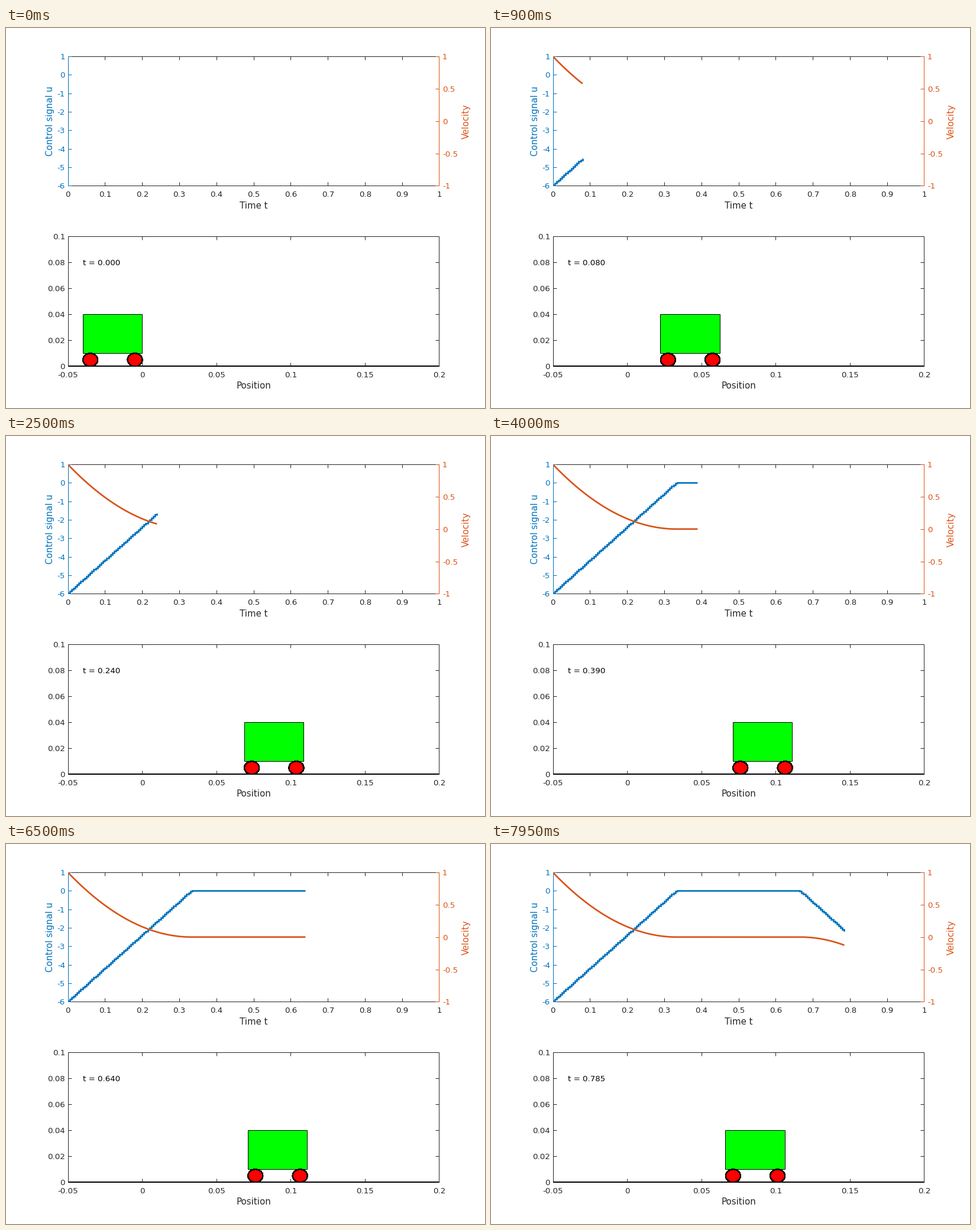
Animation of 810x644 px, one loop 8 s. Source, as a matplotlib script:

```python
import numpy as np
import matplotlib.pyplot as plt
from matplotlib.animation import FuncAnimation
from matplotlib.patches import Ellipse, Rectangle

W, H, DPI = 810, 644, 64
PT = 72 / DPI  # points per pixel
FRAMES, INTERVAL = 160, 50
DT = 0.005

DARK = (0.15, 0.15, 0.15)
BLUE = (0, 0.447, 0.741)
ORANGE = (0.85, 0.325, 0.098)
LEFT, RIGHT = 104.52, 732.49
TICK = 6

plt.rcParams["font.family"] = "DejaVu Sans"
fig = plt.figure(figsize=(W / DPI, H / DPI), dpi=DPI, facecolor="white")
ax = fig.add_axes([0, 0, 1, 1])
ax.set_xlim(0, W)
ax.set_ylim(H, 0)
ax.axis("off")


class Panel:
    """Maps data ranges onto a pixel box and draws its frame."""

    def __init__(self, top, bottom, xlim):
        self.top, self.bottom, self.xlim = top, bottom, xlim

    def x(self, v):
        lo, hi = self.xlim
        return LEFT + (RIGHT - LEFT) * (v - lo) / (hi - lo)

    def y(self, v, lo, hi):
        return self.bottom - (self.bottom - self.top) * (v - lo) / (hi - lo)

    def x_axis(self, count, title):
        for y in (self.top, self.bottom):
            line([LEFT, RIGHT], [y, y], DARK)
        for v in np.linspace(*self.xlim, count):
            x = self.x(v)
            line([x, x], [self.top, self.top + TICK], DARK)
            line([x, x], [self.bottom, self.bottom - TICK], DARK)
            label(x + 0.3, self.bottom + 18.6, number(v), DARK, ha="center")
        label((LEFT + RIGHT) / 2, self.bottom + 38.2, title, DARK, 15, ha="center")

    def y_axis(self, lo, hi, count, color, side, labels=True):
        edge, inward = (LEFT, TICK) if side == "left" else (RIGHT, -TICK)
        line([edge, edge], [self.top, self.bottom], color)
        for v in np.linspace(lo, hi, count):
            y = self.y(v, lo, hi)
            line([edge, edge + inward], [y, y], color)
            if not labels:
                continue
            if side == "left":
                label(edge - 4.5, y + 5, number(v), color, ha="right")
            else:
                label(edge + 5.4, y + 5, number(v), color, ha="left")


def line(xs, ys, color, width=1, **kw):
    return ax.plot(xs, ys, color=color, lw=width * PT,
                   solid_capstyle="butt", **kw)[0]


def label(x, y, s, color, size=13.33, **kw):
    return ax.text(x, y, s, color=color, fontsize=size * PT, va="baseline", **kw)


def number(v):
    return f"{round(v, 3) + 0.0:g}"


def side_title(x, s, color):
    label(x, 158, s, color, 15, ha="center", rotation=90, rotation_mode="anchor")


# Optimal braking against a wall at 1/9, then the mirrored return.
def phases(t):
    return np.maximum(1 - 3 * t, 0), np.maximum(3 * t - 2, 0)


def velocity(t):
    a, b = phases(t)
    return a**2 - b**2


def control(t):
    """Constant acceleration held over one step."""
    return (velocity(t + DT) - velocity(t)) / DT


def position(t):
    a, b = phases(t)
    return (1 - a**3 - b**3) / 9


graph = Panel(48, 267.4, (0, 1))
graph.x_axis(11, "Time t")
graph.y_axis(-6, 1, 8, BLUE, "left")
graph.y_axis(-1, 1, 5, ORANGE, "right")
side_title(79, "Control signal u", BLUE)
side_title(783, "Velocity", ORANGE)

track = Panel(353, 573, (-0.05, 0.2))
track.x_axis(6, "Position")
track.y_axis(0, 0.1, 6, DARK, "left")
track.y_axis(0, 0.1, 6, DARK, "right", labels=False)
line([LEFT, RIGHT + 0.5], [573, 573], "black", 2)

clip = Rectangle((105, 48), 628, 220, transform=ax.transData)
u_line = line([], [], BLUE, 2.67, drawstyle="steps-post",
              solid_joinstyle="miter", zorder=3)
v_line = line([], [], ORANGE, 2.67, zorder=4)
for curve in (u_line, v_line):
    curve.set_clip_path(clip)

clock = label(track.x(-0.04) + 0.4, 402, "", "black", ha="left")

unit = (RIGHT - LEFT) / 0.25  # pixels per unit of position
body = Rectangle((0, 485), 0.04 * unit, 66, fc="#00ff00", ec="black",
                 lw=PT, zorder=5)
wheels = [Ellipse((0, 562), 0.01 * unit, 22, fc="red", ec="black",
                  lw=1.3 * PT, antialiased=False, zorder=5) for _ in range(2)]
for part in (body, *wheels):
    ax.add_patch(part)


def update(i):
    step = max(i - 2, 0)
    ts = np.arange(step + 1) * DT
    t = ts[-1]
    xs = graph.x(ts)
    u_line.set_data(xs, graph.y(control(ts), -6, 1))
    v_line.set_data(xs, graph.y(velocity(ts), -1, 1))
    for curve in (u_line, v_line):
        curve.set_visible(step > 0)

    front = position(t)
    body.set_x(track.x(front - 0.04))
    for wheel, offset in zip(wheels, (0.035, 0.005)):
        wheel.set_center((track.x(front - offset) + 0.5, 562.3))
    clock.set_text(f"t = {t:.3f}")
    return [u_line, v_line, body, *wheels, clock]


anim = FuncAnimation(fig, update, frames=FRAMES, interval=INTERVAL,
                     repeat=True, repeat_delay=0, blit=False)
plt.show()
```
